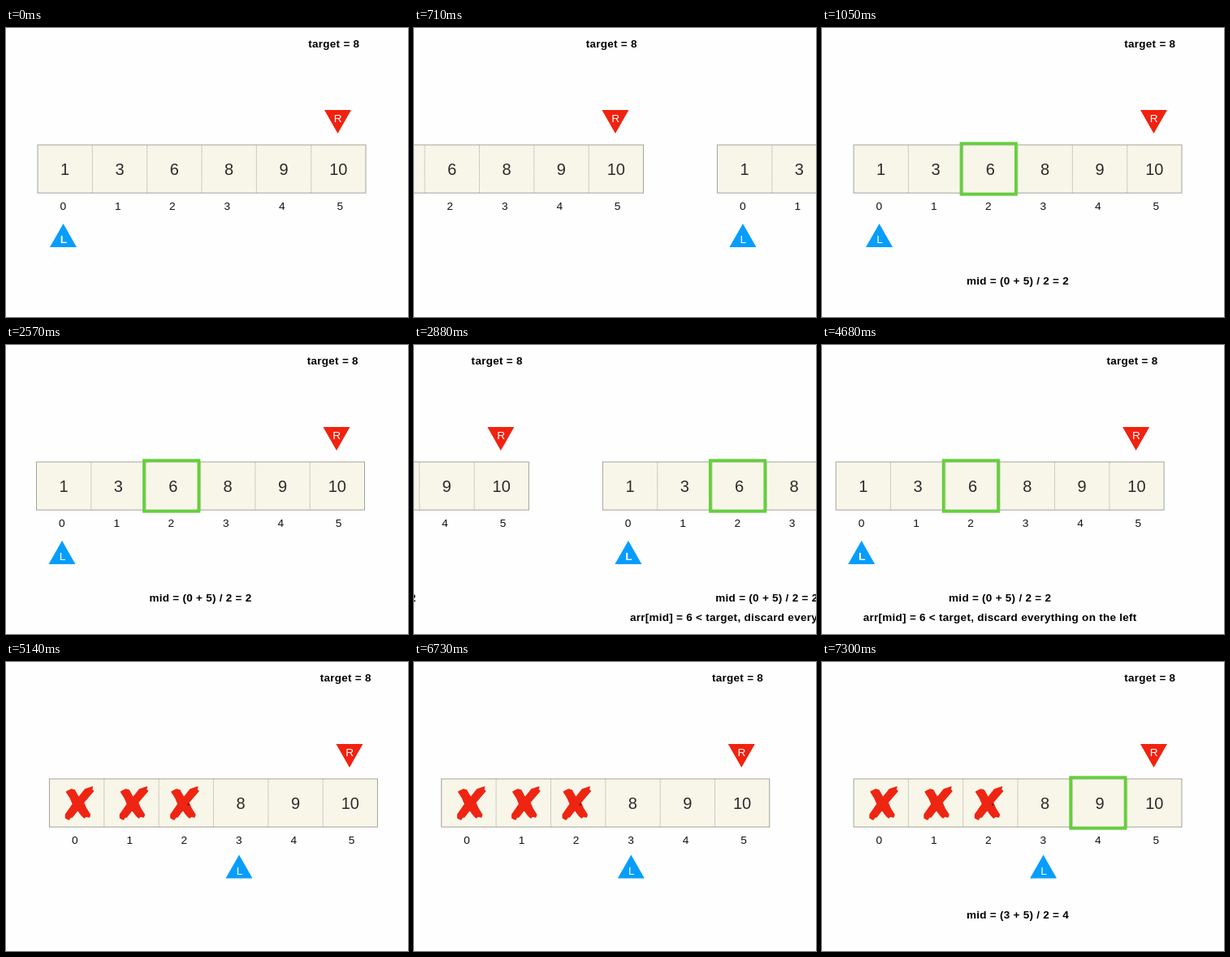
Animation, 495 px wide and 356 px high, one loop 8000 ms. Source, as an HTML page:

```html
<!DOCTYPE html>
<html lang="en">
<head>
<meta charset="utf-8">
<title>Binary search</title>
<style>
  html, body { margin: 0; width: 100%; height: 100%; overflow: hidden; background: #fefefe; }
  svg { display: block; width: 495px; height: 356px; }
  text { text-anchor: middle; font: 13.7px "Liberation Sans", Arial, sans-serif; fill: #111; }
  .value { font-size: 20px; fill: #2c2c2a; }
  .note { font-weight: bold; font-size: 13.5px; letter-spacing: 0.02em; fill: #000; }
  .pointer { font-size: 13.7px; fill: #fff; }
  .strong { font-weight: bold; }
  .array { fill: #f8f6e9; stroke: #a3a39b; }
  .divider { stroke: #b8b7ad; stroke-dasharray: 2 1; }
  .mid { fill: none; stroke: #64cf3d; stroke-width: 3.8; }
  .cross { fill: #ee2512; stroke: #ee2512; stroke-width: 1.4; stroke-linejoin: round; }
</style>
</head>
<body>
<svg id="stage" viewBox="0 0 495 356"></svg>
<script>
const WIDTH = 495, LOOP = 8000, CELL = 67.35;
const values = [1, 3, 6, 8, 9, 10];
const indexX = [70.3, 137.8, 204.9, 272.3, 339.8, 411.2];
const crossX = [75, 142, 204.5];
const CROSS = 'M-15-14L-9-17L-5-16L0-7L8-17L17-20L16-17L18-15L6-1L9 6L14 14L13 17' +
  'L9 16L7 18Q3 15-1 8L-8 17L-10 17L-12 20L-16 18L-16 14L-7 1L-10-6Z';

const slides = [
  { left: 0, strong: true },
  { left: 0, mid: 2, notes: ['mid = (0 + 5) / 2 = 2'] },
  { left: 0, mid: 2, strong: true,
    notes: ['mid = (0 + 5) / 2 = 2', 'arr[mid] = 6 < target, discard everything on the left'] },
  { left: 3 },
  { left: 3, mid: 4, notes: ['mid = (3 + 5) / 2 = 4'] }
];

// begin: where the easing starts; from/to: when movement is visible
const pushes = [
  { begin: 465, from: 500, to: 1050, steps: 17 },
  { begin: 2550, from: 2570, to: 3120, steps: 20 },
  { begin: 4599, from: 4680, to: 5200, steps: 16 },
  { begin: 6690, from: 6730, to: 7300, steps: 17 }
];
const FIRST_HOLD = 60;

const label = (x, y, content, cls = '') =>
  `<text x="${x}" y="${y}" class="${cls}">${String(content).replace('<', '&lt;')}</text>`;

function drawSlide({ left, mid, strong, notes = [] }) {
  const lift = left ? -3.5 : 0;
  const leftX = 70.5 + left * CELL;
  let out = label(403.8, 24, 'target = 8', 'note');
  out += '<rect class="array" x="39" y="144" width="404" height="59.2"/>';
  values.forEach((value, i) => {
    const x = 39 + i * CELL;
    if (i) out += `<path class="divider" d="M${x} 144.5V203"/>`;
    if (i >= left) out += label(x + 33.6, 181.3, value, 'value');
    out += label(indexX[i], 224, i);
  });
  for (const x of crossX.slice(0, left))
    out += `<path class="cross" d="${CROSS}" transform="translate(${x} 174)"/>`;
  if (left) out += '<ellipse cx="210" cy="175.5" rx="0.8" ry="1.6" fill="#222"/>';
  if (mid !== undefined)
    out += `<rect class="mid" x="${171.5 + (mid - 2) * CELL}" y="142.3" width="67.4" height="62.5"/>`;
  out += '<path d="M392 101h33l-16.5 29z" fill="#f1220f"/>' + label(408.7, 116.3, 'R', 'pointer');
  out += `<path d="M${leftX} ${241 + lift}l16.5 29h-33z" fill="#069dfc"/>`;
  out += label(leftX + 0.5, 265 + lift, 'L', strong ? 'pointer strong' : 'pointer');
  notes.forEach((note, i) => out += label(241, 315.5 + i * 24, note, 'note'));
  return `<g>${out}</g>`;
}

const stage = document.getElementById('stage');
stage.innerHTML = slides.map(drawSlide).join('');
const groups = [...stage.children];

function progress(t, { begin, from, to, steps }) {
  if (t < from) return 0;
  if (t >= to) return 1;
  const second = from + FIRST_HOLD;
  const step = (to - second) / (steps - 2);
  const shown = t < second ? from : second + Math.floor((t - second) / step) * step;
  return Math.sin(Math.PI / 2 * (shown - begin) / (to - begin)) ** 2;
}

function render(t) {
  const position = pushes.reduce((sum, push) => sum + progress(t, push), 0);
  groups.forEach((group, i) => {
    const offset = i - position;
    group.setAttribute('transform', `translate(${offset * WIDTH} 0)`);
    group.style.display = Math.abs(offset) < 1 ? '' : 'none';
  });
}

const start = performance.now();
function tick() {
  render((performance.now() - start) % LOOP);
  requestAnimationFrame(tick);
}
tick();
</script>
</body>
</html>
```
